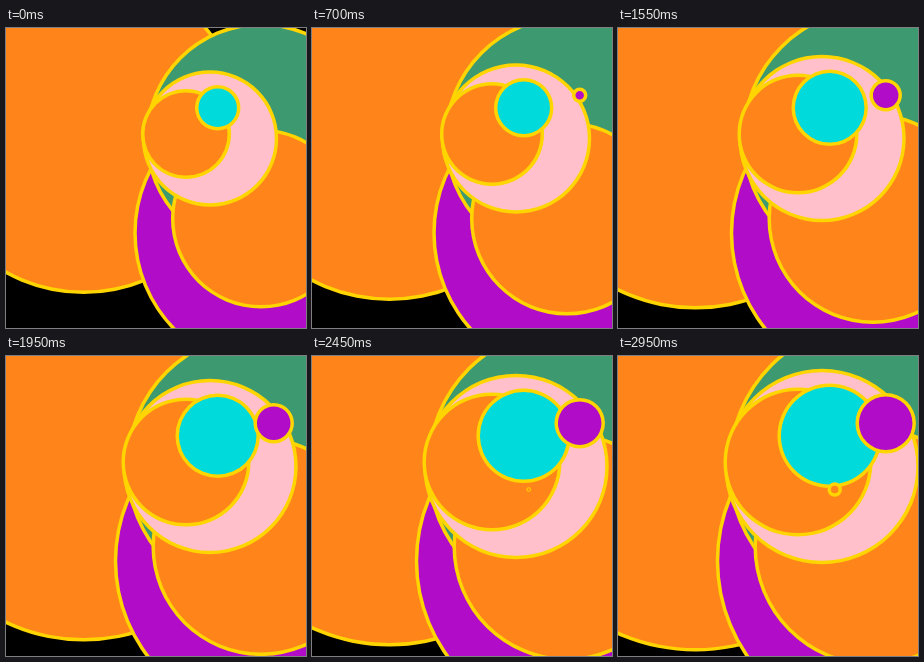
Recreate the animation shown at these times as an HTML page with a canvas. Size 300 by 300 pixels, loop 3 s.

```html
<!DOCTYPE html>
<html>
<head>
<meta charset="utf-8">
<title>Growing circles</title>
<style>
html, body { margin: 0; width: 100%; height: 100%; overflow: hidden; background: #000; }
canvas { display: block; }
</style>
</head>
<body>
<canvas width="300" height="300"></canvas>
<script>
const ctx = document.querySelector('canvas').getContext('2d');
const LOOP = 3000, STEP = 50, GROWTH = 0.01, LINE = 3.5;
const ORANGE = '#ff851b', PURPLE = '#b10dc9', GREEN = '#3d9970',
      PINK = '#ffc0cb', CYAN = '#00dadb', GOLD = '#ffd500';

// x, y, radius at loop start (negative: appears later), fill; oldest first
const circles = [
  [77.5, 104, 160.3, ORANGE],
  [266, 205, 137, PURPLE],
  [255, 110.5, 114, GREEN],
  [255, 190.5, 88.3, ORANGE],
  [204, 110.5, 66.5, PINK],
  [180, 106, 43.3, ORANGE],
  [211.7, 79.8, 21, CYAN],
  [267.7, 67.2, -1, PURPLE],
  [216.7, 133.6, -24, ORANGE]
];

function drawCircle(x, y, r, fill) {
  ctx.beginPath();
  ctx.arc(x, y, r, 0, 2 * Math.PI);
  ctx.fillStyle = fill;
  ctx.fill();

  // Outline as a ring, which stays hollow even on the tiniest circles
  ctx.beginPath();
  ctx.arc(x, y, r + LINE / 2, 0, 2 * Math.PI);
  ctx.closePath();
  const inner = Math.abs(r - LINE / 2);
  ctx.moveTo(x + inner, y);
  ctx.arc(x, y, inner, 0, 2 * Math.PI);
  ctx.fillStyle = GOLD;
  ctx.fill('evenodd');
}

function draw() {
  const t = Math.floor(performance.now() % LOOP / STEP) * STEP;
  ctx.fillStyle = '#000';
  ctx.fillRect(0, 0, 300, 300);
  for (const [x, y, start, fill] of circles) {
    const r = start + t * GROWTH;
    if (r > 0.1) drawCircle(x, y, r, fill);
  }
  requestAnimationFrame(draw);
}
draw();
</script>
</body>
</html>
```
